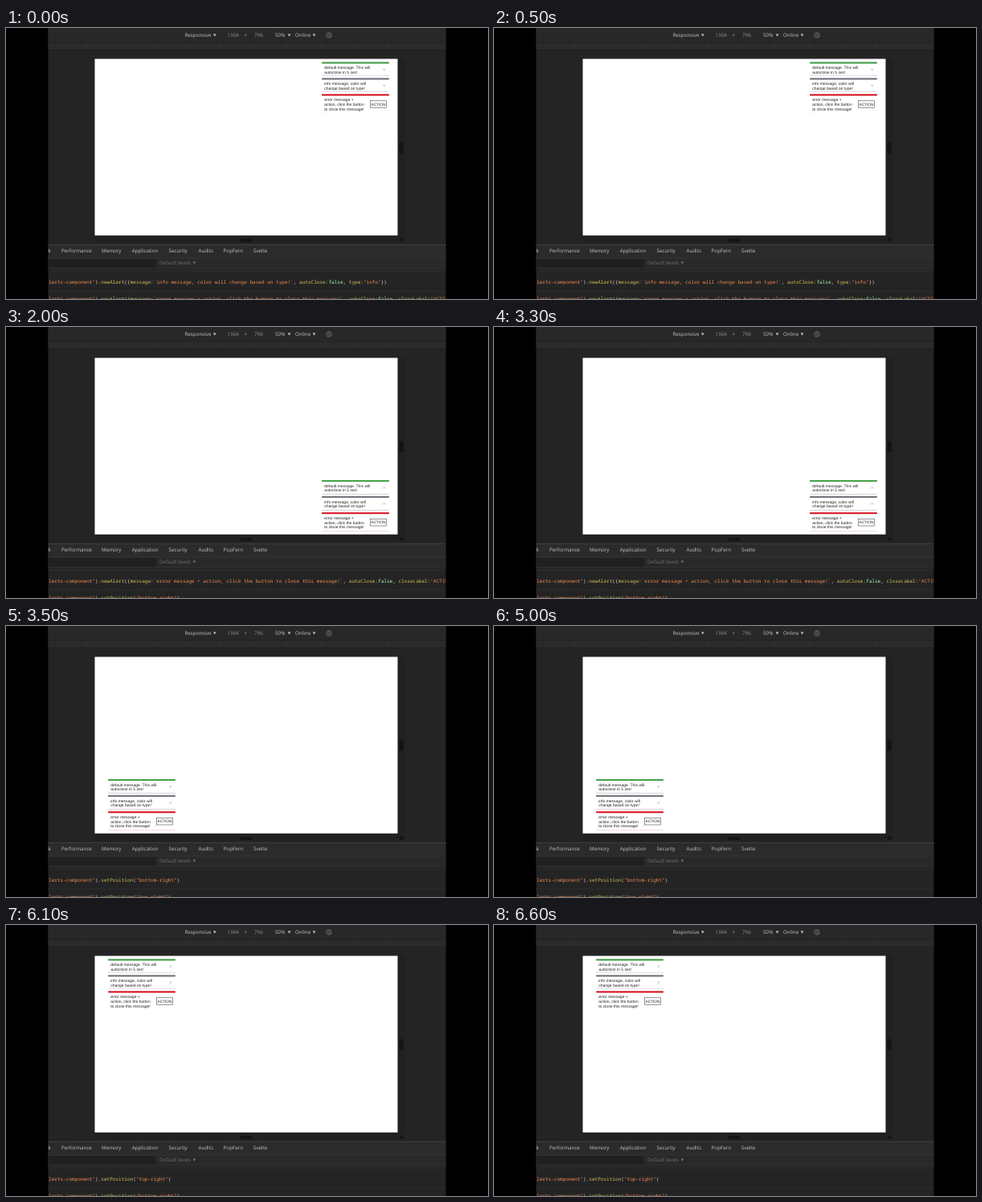
Recreate the animation shown at these times as an HTML page. Size 600 by 338 pixels, loop 6.7 s.

```html
<!DOCTYPE html>
<html lang="en">
<head>
<meta charset="utf-8">
<title>Alert positions</title>
<style>
html, body { margin: 0; width: 100%; height: 100%; overflow: hidden; background: #000; }
svg { display: block; width: 100%; height: 100%; }
text { white-space: pre; text-rendering: geometricPrecision; }
.ui { font: 6.25px "Open Sans", "Noto Sans", sans-serif; fill: #c4c4c4; }
.dim { fill: #929292; }
.off { fill: #707070; }
.code { font: 6.06px "Noto Sans Mono", "DejaVu Sans Mono", monospace; fill: #d8d8d8; }
.str { fill: #f28b54; }
.prop { fill: #d2c057; }
.atom { fill: #a1f7b5; }
.card { font: 5px "Liberation Sans", Arial, sans-serif; fill: #222; }
</style>
</head>
<body>
<svg viewBox="0 0 600 338" preserveAspectRatio="none">
  <defs><clipPath id="panel"><path d="M52.5 0H547.5V338H52.5z"/></clipPath></defs>
  <rect width="600" height="338"/>
  <g clip-path="url(#panel)">
    <rect x="52" width="496" height="338" fill="#242424"/>
    <rect x="52" width="496" height="18" fill="#282828"/>
    <rect x="52" y="18" width="496" height="9" fill="#2b2b2b"/>
    <path d="M52 18H548M52 27H548" stroke="#1d1d1d" stroke-width=".7"/>
    <path d="M101 18v8M184 18v8M225 18v8M267 18v8M309 18v8M350 18v8M392 18v8M434 18v8M475 18v8" stroke="#363636" stroke-width=".6"/>
    <path d="M487.5 38.5h9.5v229h-386.500v-9h377z" fill="#212121"/>
    <path d="M489.500 142.500h5v13.500h-5zM292 263h14v4h-14zM490 262.500h4.500v4h-4.500z" fill="#141414"/>
    <rect x="110.500" y="38.500" width="377" height="220.200" fill="#fff"/>
    <rect x="52" y="270" width="496" height="17" fill="#2b2b2b"/>
    <rect x="52" y="287" width="496" height="12.500" fill="#292929"/>
    <rect x="52" y="288" width="134.500" height="11" fill="#202020"/>
    <path d="M52 270.300H548" stroke="#474747" stroke-width=".8"/>
    <path d="M52 287H548M52 299.800H548" stroke="#3b3b3b" stroke-width=".6"/>
    <path d="M52 303H548M52 328H548" stroke="#363636" stroke-width=".6"/>
    <g id="labels"></g>
    <g fill="none" stroke="#777" stroke-width=".8">
      <circle cx="402" cy="9" r="3.300"/>
      <path d="M400.600 8.200l1.600-1.500 1.800 3-1.700 1.500z"/>
    </g>
    <text id="line" class="code" x="53" y="319"></text>
    <text id="next" class="code" x="53" y="340.300"></text>
    <g id="cards"></g>
  </g>
</svg>
<script>
const $ = id => document.getElementById(id);
const label = (x, y, s, cls = "") => `<text class="ui ${cls}" x="${x}" y="${y}">${s}</text>`;
const arrow = (x, y, c) => `<path d="M${x} ${y}h3.6l-1.800 3.300z" fill="${c}"/>`;

const tabs = [[52.6, "k"], [69, "Performance"], [119, "Memory"], [156.7, "Application"],
  [202.5, "Security"], [239.5, "Audits"], [270.6, "PopFern"], [308, "Svelte"]];
$("labels").innerHTML =
  label(222.5, 11.3, "Responsive") + arrow(258, 7.5, "#c4c4c4") +
  label(275.5, 11.3, "1364", "dim") + label(296.6, 11.3, "×", "dim") + label(309, 11.3, "796", "dim") +
  label(335, 11.3, "50%") + arrow(350.8, 7.5, "#c4c4c4") +
  label(360, 11.3, "Online") + arrow(381.8, 7.5, "#c4c4c4") +
  tabs.map(([x, s]) => label(x, 280.4, s)).join("") +
  label(191, 295.3, "Default levels", "off") + arrow(232.6, 291.5, "#707070");

// Cards are laid out from the top left corner of the stack
function card(y, h, color, shadow, rows, control) {
  const text = rows.map((s, i) => `<text x="3.200" y="${y + 8.6 + i * 5.75}">${s}</text>`).join("");
  return `<g class="card"><rect y="${y}" width="84" height="${h}" rx="1" fill="#fff"
    style="filter:drop-shadow(.5px .6px .7px ${shadow})"/>
    <rect y="${y}" width="84" height="2" rx=".8" fill="${color}"/>${text}${control}</g>`;
}
const cross = y => `<path d="M76.500 ${y - 1.2}l2.400 2.400m0-2.400l-2.400 2.400" stroke="#999" stroke-width=".6"/>`;
const button = `<rect x="60.500" y="48.300" width="20" height="8.600" fill="#fff" stroke="#666" stroke-width=".7"/>
  <text x="70.500" y="54.400" text-anchor="middle" style="font-size:4.800px">ACTION</text>`;
$("cards").innerHTML =
  card(0, 17.4, "#43a047", "#6b5072", ["default message. This will", "autoclose in 5 sec!"], cross(9.3)) +
  card(20, 17.4, "#77727c", "#6b5072", ["info message, color will", "change based on type!"], cross(29.3)) +
  card(40.2, 23.4, "#d8121f", "#b04a70", ["error message +", "action, click the button", "to close this message!"], button);

const token = /("[^"]*"?|`[^`]*`)|\b(false)\b|([a-z]\w*)/gi;
const paint = s => `<tspan class="str">lerts-component"</tspan>` + s.replace(token, (m, str, atom) =>
  `<tspan class="${str ? "str" : atom ? "atom" : "prop"}">${m}</tspan>`);

const move = where => `).setPosition("${where}")`;
const alertCall = (msg, rest) => `).newAlert({message:\`${msg}\`, autoClose:false, ${rest}`;
const info = alertCall("info message, color will change based on type!", 'type:"info"})');
const error = alertCall("error message + action, click the button to close this message!", 'closeLabel:"ACTION", type:"error"})');

const right = 393, left = 127, top_ = 42.4, bottom = 191.1;
const steps = [
  { at: 0, x: right, y: top_, line: info, next: error },
  { at: 1000, x: right, y: bottom, line: error, next: move("bottom-right") },
  { at: 3500, x: left, y: bottom, line: move("bottom-right"), next: move("top-right") },
  { at: 6100, x: left, y: top_, line: move("top-right"), next: move("bottom-right") }
];

let shown;
function draw() {
  const t = performance.now() % 6700;
  const step = steps.findLast(s => s.at <= t);
  if (step !== shown) {
    shown = step;
    $("cards").setAttribute("transform", `translate(${step.x} ${step.y})`);
    $("line").innerHTML = paint(step.line);
    $("next").innerHTML = paint(step.next);
  }
  requestAnimationFrame(draw);
}
draw();
</script>
</body>
</html>
```
